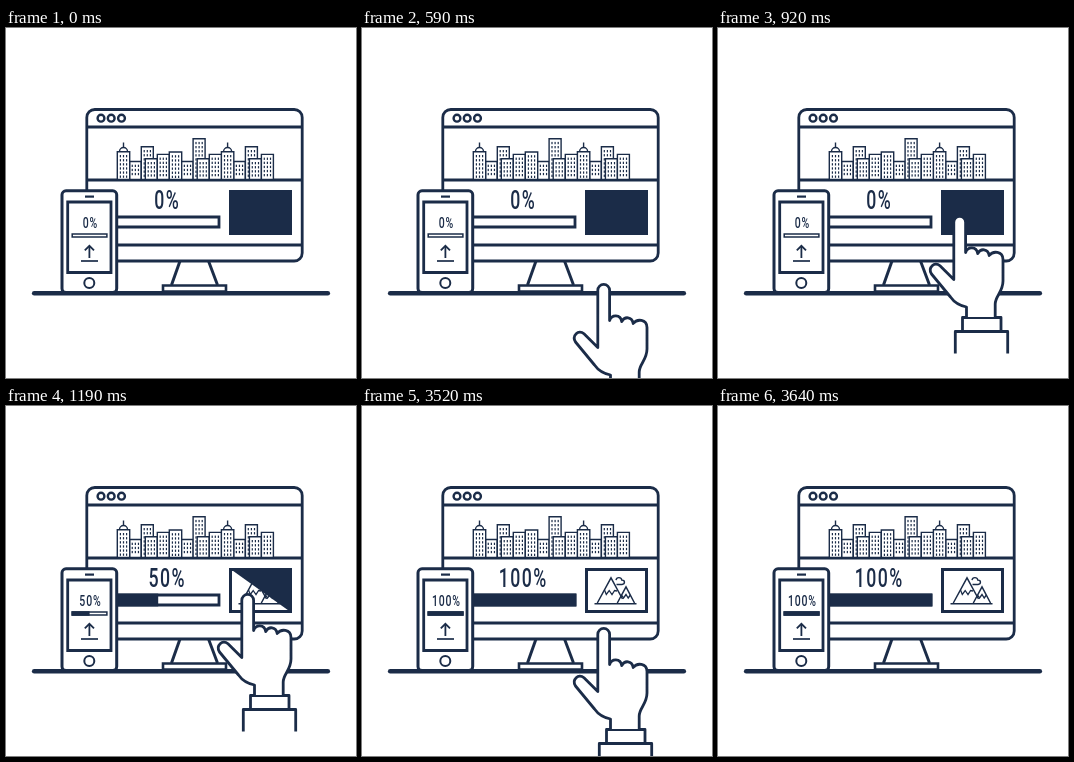
Write an HTML page with a canvas that moves like this. It is 350x350 px and loops after 3740 ms.

```html
<!DOCTYPE html>
<html lang="en">
<head>
<meta charset="utf-8">
<title>Upload</title>
<style>
html, body { margin: 0; width: 100%; height: 100%; overflow: hidden; background: #fff; }
canvas { display: block; width: 350px; height: 350px; }
</style>
</head>
<body>
<canvas id="stage"></canvas>
<script>
const INK = '#1b2c48';
const LOOP = 3740, STEP = 30, RISE = 34;
const canvas = document.getElementById('stage');
const ctx = canvas.getContext('2d');
const dpr = window.devicePixelRatio || 1;
canvas.width = canvas.height = Math.round(350 * dpr);

function paint(width, fill) {
  if (fill) {
    ctx.fillStyle = fill;
    ctx.fill();
  }
  ctx.lineWidth = width;
  ctx.stroke();
}

// Box given by the centre of its outline
function box(x1, y1, x2, y2, width, fill, radius = 0) {
  ctx.beginPath();
  ctx.roundRect(x1, y1, x2 - x1, y2 - y1, radius);
  paint(width, fill);
}

function line(width, ...p) {
  ctx.beginPath();
  for (let i = 0; i < p.length; i += 2) ctx.lineTo(p[i], p[i + 1]);
  ctx.lineWidth = width;
  ctx.stroke();
}

function ring(x, y, r, width) {
  ctx.beginPath();
  ctx.arc(x, y, r, 0, Math.PI * 2);
  paint(width);
}

function bar(x1, y1, x2, y2) {
  ctx.fillStyle = INK;
  ctx.fillRect(x1, y1, x2 - x1, y2 - y1);
}

// Condensed lettering
function label(text, x, y, size) {
  ctx.save();
  ctx.translate(x, y);
  ctx.scale(0.7, 1);
  ctx.font = `500 ${size}px Roboto, "Liberation Sans", sans-serif`;
  ctx.letterSpacing = size * 0.08 + 'px';
  ctx.textAlign = 'center';
  ctx.fillStyle = INK;
  ctx.fillText(text, size * 0.04, 0);
  ctx.restore();
}

function building(x, top, width = 12) {
  box(x, top, x + width, 151.5, 1.4, '#fff');
  for (let i = 0; i < 3; i++) {
    const wx = x + width / 2 + (i - 1) * 3.1 - 0.6;
    for (let y = top + 3.2; y < 148.5; y += 4.1) bar(wx, y, wx + 1.2, y + 2.3);
  }
}

function tower(x) {
  const mid = x + 6.2;
  line(1.4, mid, 114.5, mid, 120);
  ctx.beginPath();
  ctx.arc(mid, 123.5, 4, Math.PI, 0);
  paint(1.4, '#fff');
  building(x, 123.8, 12.4);
}

function skyline() {
  for (const x of [111.3, 215.4]) {
    building(x + 12.2, 133.5, 11.7);
    building(x + 24, 118.8);
    building(x + 28, 130.8);
    building(x + 40, 126.4);
    tower(x);
  }
  building(163.3, 124, 12.4);
  building(175.7, 133.5, 11.5);
  building(187.1, 110.7);
  building(191.2, 130.8);
  building(203.3, 126.4);
}

function monitor() {
  line(3, 174, 233, 165.5, 257);
  line(3, 202.5, 233, 211.5, 257);
  box(157, 257.5, 220, 263.5, 2.6, '#fff');
  box(80.8, 81.5, 296.2, 233, 2.8, '#fff', 8);
  for (const y of [99, 152, 217]) line(2.8, 81, y, 296, y);
  for (const x of [95, 105.2, 115.5]) ring(x, 90.2, 3.4, 2.4);
  skyline();
}

function phone(p) {
  box(56, 162.8, 110.7, 264.5, 3, '#fff', 4);
  line(2.2, 79, 168.6, 88, 168.6);
  box(61.7, 174, 105, 244.5, 2.8, '#fff');
  ring(83.3, 255, 5, 2);
  box(66.2, 205.9, 100.9, 209.1, 1.5, '#fff');
  bar(65.5, 205.2, 65.5 + 36.2 * p, 209.8);
  line(1.8, 83.4, 230, 83.4, 218);
  line(1.8, 78.8, 222.4, 83.4, 217.8, 88, 222.4);
  line(1.7, 75, 233, 92, 233);
}

function picture(p) {
  const x = 223, y = 162, w = 63, h = 45;
  ctx.save();
  ctx.beginPath();
  ctx.rect(x, y, w, h);
  ctx.clip();
  box(x + 1.5, y + 1.5, x + w - 1.5, y + h - 1.5, 3, '#fff');

  line(1.5, 232.5, 197.8, 274.5, 197.8);
  line(1.5, 235.3, 197, 249, 171.8, 260.5, 193);
  line(1.3, 242.5, 184, 244.3, 188.5, 247.2, 184.5, 250, 188.5, 252.6, 184.5, 255, 185);
  line(1.5, 255.3, 197, 264, 180.8, 272.5, 197);
  line(1.3, 259.6, 189, 261.5, 192, 264, 188.5, 266.2, 192, 268.4, 189);
  ctx.beginPath();
  ctx.moveTo(254.5, 178.5);
  ctx.lineTo(260, 178.5);
  ctx.bezierCurveTo(263.5, 178, 263, 173.8, 260, 174.2);
  ctx.bezierCurveTo(259, 170.5, 254.5, 171, 254, 174.2);
  paint(1.4);

  // Diagonal cover leaving towards the top right corner
  if (p < 1) {
    const c = 2 * p - 1;
    ctx.beginPath();
    for (const [u, v] of [[c - 1, -1], [c + 2, 2], [4, 2], [4, -1]]) {
      ctx.lineTo(x + u * w, y + v * h);
    }
    ctx.fillStyle = INK;
    ctx.fill();
  }
  ctx.restore();
}

function hand(dy, press) {
  const tip = 194.3 + press;
  ctx.save();
  ctx.translate(0, dy);

  ctx.fillStyle = '#fff';
  ctx.fillRect(237.3, 303.5, 52.4, 22);
  line(2.8, 237.3, 325.5, 237.3, 303.5, 289.7, 303.5, 289.7, 325.5);
  box(244.5, 289.5, 283, 303.5, 2.8, '#fff');

  ctx.beginPath();
  ctx.moveTo(248.5, 289);
  ctx.lineTo(248.5, 279);
  ctx.bezierCurveTo(241, 277.5, 236, 274, 232.5, 269);
  ctx.lineTo(213.5, 246);
  ctx.bezierCurveTo(209.5, 239.5, 216.5, 233, 222, 237.8);
  ctx.lineTo(235.8, 251.5);
  ctx.lineTo(235.8, tip);
  ctx.arc(241.7, tip, 5.9, Math.PI, 0);
  ctx.lineTo(247.6, 224.5);
  ctx.bezierCurveTo(249.5, 218.5, 258.5, 218, 259.7, 225.5);
  ctx.bezierCurveTo(262.5, 220, 270, 220.5, 271.2, 227.5);
  ctx.bezierCurveTo(275, 222.5, 284.8, 223, 285, 231.5);
  ctx.lineTo(285, 253);
  ctx.bezierCurveTo(285, 264, 277.2, 268, 277.2, 276);
  ctx.lineTo(277.2, 289);
  paint(2.8, '#fff');
  ctx.restore();
}

// Hand moves in even jumps: five up, five down
function handOffset(t) {
  if (t < 530 || t >= 3640) return null;
  if (t < 650) return RISE * (4 - Math.floor((t - 530) / STEP));
  if (t < 3520) return 0;
  return RISE * (1 + Math.floor((t - 3520) / STEP));
}

function progress(t) {
  return t < 990 ? 0 : Math.min(4, 1 + Math.floor((t - 990) / 200)) / 4;
}

function draw(t) {
  const p = progress(t);
  const text = Math.round(p * 100) + '%';
  const dy = handOffset(t);

  ctx.setTransform(dpr, 0, 0, dpr, 0, 0);
  ctx.fillStyle = '#fff';
  ctx.fillRect(0, 0, 350, 350);
  ctx.strokeStyle = INK;
  ctx.lineCap = 'butt';
  ctx.lineJoin = 'miter';

  ctx.lineCap = 'round';
  line(4.6, 28.2, 265.2, 321.8, 265.2);
  ctx.lineCap = 'butt';

  monitor();
  box(91.5, 189, 213, 199, 2.8, '#fff');
  bar(90, 187.6, 90 + 124.4 * p, 200.4);
  label(text, 160.5, 181, 25.3);
  picture(p);
  phone(p);
  label(text, 84, 199.5, 15);

  ctx.lineJoin = 'round';
  if (dy !== null) hand(dy, t >= 750 && t < 920 ? 3 : 0);
}

let start;
function tick(now) {
  start ??= now;
  draw((now - start) % LOOP);
  requestAnimationFrame(tick);
}
draw(0);
requestAnimationFrame(tick);
</script>
</body>
</html>
```
